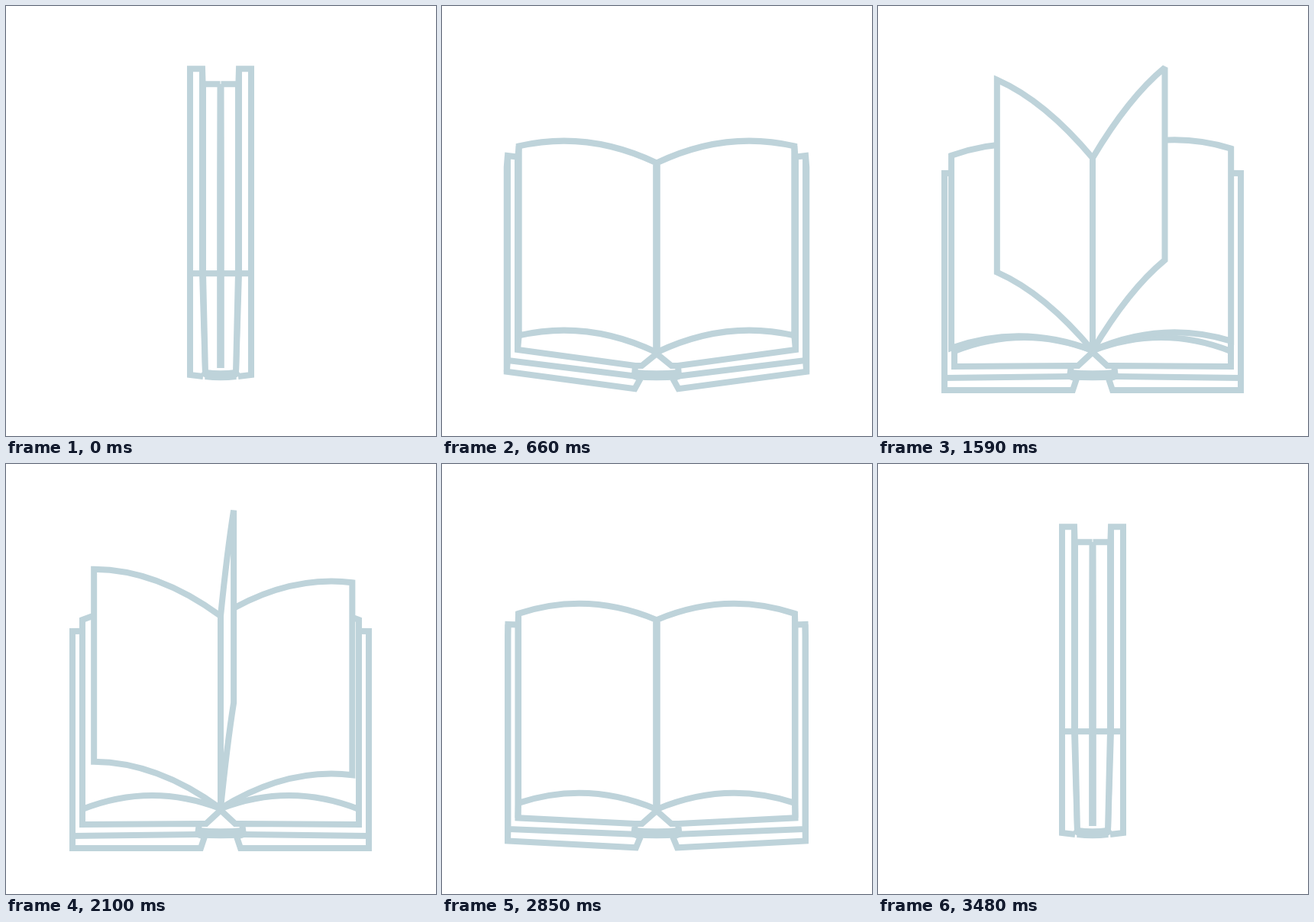
Recreate the animation shown at these times as an HTML page with a canvas. Size 563x563 px, loop 3.63 s.

```html
<!DOCTYPE html>
<html>
<head>
<meta charset="utf-8">
<style>
html, body { margin: 0; width: 100%; height: 100%; overflow: hidden; background: #fff; }
canvas { display: block; }
</style>
</head>
<body>
<canvas id="stage" width="563" height="563"></canvas>
<script>
const ctx = document.getElementById('stage').getContext('2d');
const LOOP = 3630, MID = 281, COVER_H = 268, PAGE_H = 248, LEAF_H = 252;
const TURNS = 6, FIRST_TURN = 882, TURN_GAP = 217.4, TURN_TIME = 732;

const clamp = v => Math.min(1, Math.max(0, v));
const ease = (v, amount) => v + amount * (0.5 - 0.5 * Math.cos(Math.PI * v) - v);
const up = ([x, y], h) => [x, y - h];
const bendBetween = (a, b, lift) => [(a[0] + b[0]) / 2, (a[1] + b[1]) / 2 - lift];

// Joints of the left half, p = 0 closed to p = 1 lying flat.
function pose(p) {
  const shut = 1 - p, spread = 1 - shut ** 2.7;
  const hingeOut = [241 + 14 * p * p, 483 + 20 * p];
  const rise = 135 * Math.sin(1.75 * shut);
  // Fore-edge corner of a layer: its reach from the hinge, its offset when shut and when flat.
  const foreEdge = (reach, across, above) => [
    hingeOut[0] - reach * spread + across * shut ** 1.1,
    hingeOut[1] - rise - above * p ** 0.75
  ];
  const blockIn = [261 - 8 * spread, 480 - 9 * spread];
  const pageIn = [280.2, 474 - 23 * p];
  const pageOut = foreEdge(155, 39.5, 51);
  return {
    hingeOut, blockIn, pageIn, pageOut,
    coverOut: foreEdge(168, 0, 0),
    coverIn: foreEdge(168, 16, 16),
    blockOut: foreEdge(155, 17, 31),
    hingeIn: [261 - 10 * p, 480 + 5 * p],
    spine: [258 + 2 * p, 485 + 3 * p],
    blockFold: [blockIn[0] + 4 + 5 * p, blockIn[1]],
    pageBend: bendBetween(pageIn, pageOut, 35 * p)
  };
}

function line(...points) {
  ctx.beginPath();
  points.forEach(point => ctx.lineTo(...point));
  ctx.stroke();
}

function leaf(inner, bend, outer, h) {
  ctx.beginPath();
  ctx.moveTo(...inner);
  ctx.quadraticCurveTo(...bend, ...outer);
  ctx.lineTo(...up(outer, h));
  ctx.quadraticCurveTo(...up(bend, h), ...up(inner, h));
  ctx.closePath();
  ctx.fill();
  ctx.stroke();
}

function cover(j) {
  const inTop = up(j.coverIn, COVER_H);
  line(up(j.hingeIn, COVER_H), inTop, up(j.coverOut, COVER_H), j.coverOut, j.hingeOut, j.spine);
  line(inTop, j.coverIn, j.hingeIn);
  line(j.coverOut, j.coverIn);
}

function block(j, p) {
  const outTop = up(j.blockOut, PAGE_H), pageTop = up(j.pageOut, PAGE_H);
  ctx.beginPath();
  [outTop, j.blockOut, j.blockIn, j.blockFold, j.pageIn, j.pageOut, pageTop]
    .forEach(point => ctx.lineTo(...point));
  ctx.fill();
  leaf(j.pageIn, j.pageBend, j.pageOut, PAGE_H);
  line(pageTop, outTop, j.blockOut, j.blockIn, j.hingeIn, j.spine);
  line(j.blockOut, j.pageOut);
  if (p > 0.03) line(j.blockIn, j.blockFold, up(j.pageIn, -3 * p));
}

function bothSides(draw) {
  draw();
  ctx.save();
  ctx.transform(-1, 0, 0, 1, 2 * MID, 0);
  draw();
  ctx.restore();
}

function spineBar(left) {
  ctx.lineWidth = 13;
  ctx.beginPath();
  ctx.moveTo(left, 482.5);
  ctx.quadraticCurveTo(MID, 485, 2 * MID - left, 482.5);
  ctx.stroke();
}

function turningPage(angle) {
  const c = Math.cos(angle), s = Math.sin(angle);
  const inner = [MID, 451], outer = [279.5 + 183.5 * c, 452 - 140 * s];
  leaf(inner, bendBetween(inner, outer, 15 + 19 * c * c), outer, LEAF_H);
}

function draw(t) {
  const swing = start => ease(clamp((t - start) / 615), 0.3);
  const p = swing(120) - swing(2820), joints = pose(p);

  ctx.fillStyle = '#fff';
  ctx.fillRect(0, 0, 563, 563);
  ctx.strokeStyle = '#bed3da';
  ctx.miterLimit = 2;
  ctx.lineWidth = 8;
  bothSides(() => cover(joints));
  bothSides(() => block(joints, p));
  spineBar(joints.hingeIn[0]);

  ctx.lineWidth = 8;
  Array.from({ length: TURNS }, (_, i) => (t - FIRST_TURN - i * TURN_GAP) / TURN_TIME)
    .filter(v => v > 0 && v < 1)
    .map(v => Math.PI * ease(v, 0.75))
    .sort((a, b) => Math.abs(Math.cos(b)) - Math.abs(Math.cos(a)))
    .forEach(turningPage);
}

const start = performance.now();
function tick() {
  draw((performance.now() - start) % LOOP);
  requestAnimationFrame(tick);
}
tick();
</script>
</body>
</html>
```
